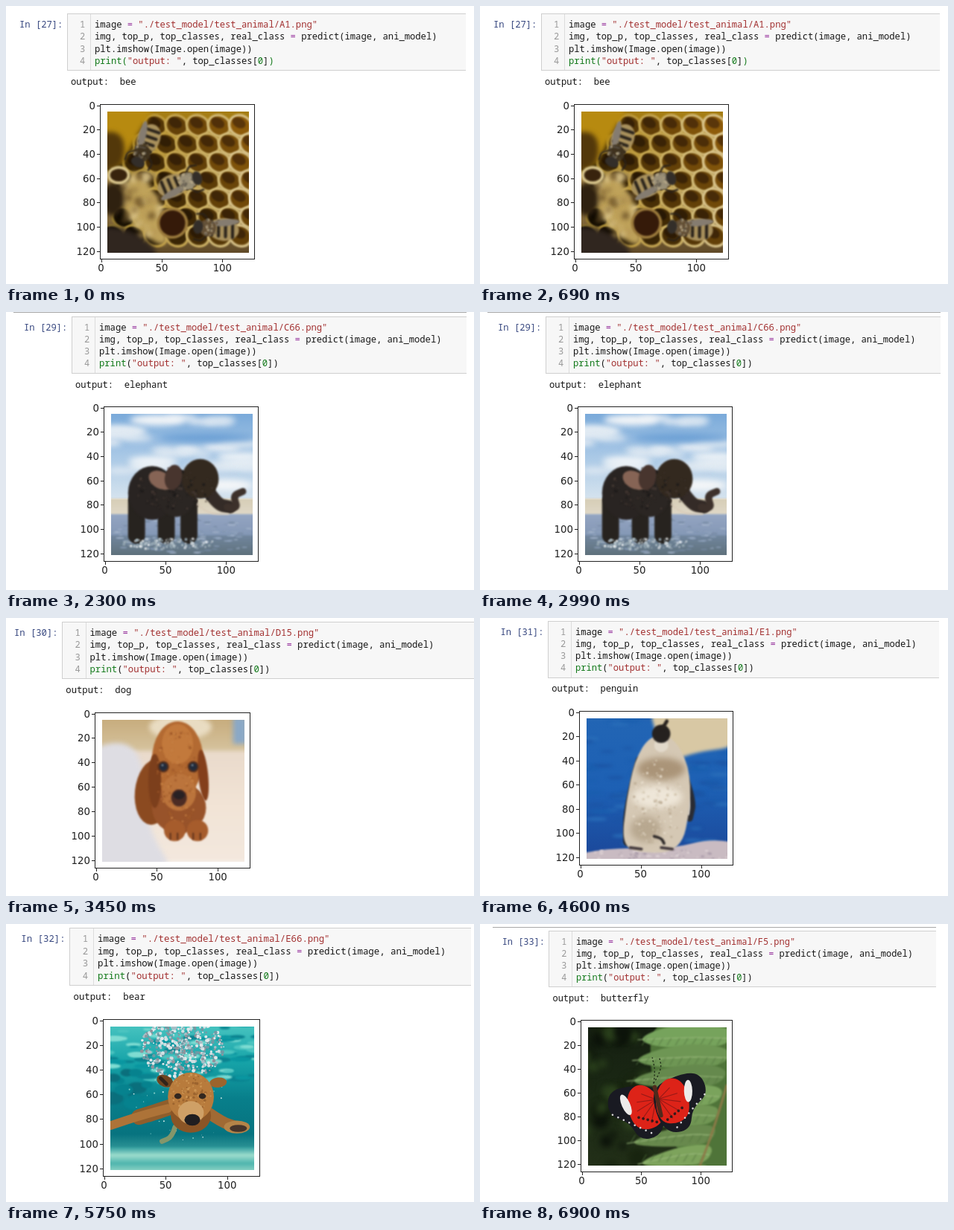
These frames come from a looping animation (628x374 px, 8 s). An HTML page with a canvas:

```html
<!DOCTYPE html>
<html lang="en">
<head>
<meta charset="utf-8">
<title>Animal classifier notebook</title>
<style>
html, body { margin: 0; width: 100%; height: 100%; overflow: hidden; background: #fff; }
canvas { display: block; }
</style>
</head>
<body>
<canvas id="stage" width="628" height="374"></canvas>
<script>
const g = document.getElementById('stage').getContext('2d');
const LOOP = 8000, STEP = 1150;
let seed = 1;
const rnd = () => (seed = (seed * 16807) % 2147483647) / 2147483647;
const soft = px => { g.filter = `blur(${px}px)`; };

function rect(color, x, y, w, h) {
  g.fillStyle = color;
  g.fillRect(x, y, w, h);
}

// Photos are drawn on a field of 100 by 100
function band(y0, y1, ...stops) {
  const f = g.createLinearGradient(0, y0, 0, y1);
  stops.forEach((c, i) => f.addColorStop(i / Math.max(1, stops.length - 1), c));
  rect(f, -5, y0, 110, y1 - y0);
}

function oval(color, x, y, rx, ry = rx, turn = 0) {
  g.beginPath();
  g.ellipse(x, y, rx, ry, turn, 0, 7);
  g.fillStyle = color;
  g.fill();
}

// Closed smooth shape through the midpoints of its corners
function blob(color, ...p) {
  const n = p.length;
  const mid = i => [(p[i % n] + p[(i + 2) % n]) / 2, (p[(i + 1) % n] + p[(i + 3) % n]) / 2];
  g.beginPath();
  g.moveTo(...mid(0));
  for (let i = 2; i <= n; i += 2) g.quadraticCurveTo(p[i % n], p[(i + 1) % n], ...mid(i));
  g.fillStyle = color;
  g.fill();
}

// Open smooth stroke with round ends
function limb(color, width, ...p) {
  const n = p.length;
  g.beginPath();
  g.moveTo(p[0], p[1]);
  for (let i = 2; i < n - 2; i += 2)
    g.quadraticCurveTo(p[i], p[i + 1], (p[i] + p[i + 2]) / 2, (p[i + 1] + p[i + 3]) / 2);
  g.lineTo(p[n - 2], p[n - 1]);
  g.strokeStyle = color;
  g.lineWidth = width;
  g.lineCap = g.lineJoin = 'round';
  g.stroke();
}

// Random dots inside an ellipse
function spots(n, colors, x, y, rx, ry, size, flat = 1) {
  for (let i = 0; i < n; i++) {
    const a = rnd() * 6.283, d = rnd() ** .6, r = size * (.3 + rnd() * .7);
    oval(colors[i % colors.length], x + Math.cos(a) * d * rx, y + Math.sin(a) * d * ry, r, r * flat);
  }
}

function placed(x, y, turn, draw) {
  g.save();
  g.translate(x, y);
  g.rotate(turn);
  draw();
  g.restore();
}

function honeybee(x, y, turn, coat) {
  placed(x, y, turn, () => {
    for (const side of [-1, 1]) limb('#2a2118', 1.3, 4, 0, 8, side * 10, 15, side * 9);
    oval('#a8905c', -5, 0, 11, 8);
    for (let s = -12; s < 4; s += 5) limb('#2c251c', 2.2, s, -5, s + 1, 5);
    oval('#857c70', -6, 5, 10, 2.5, -.2);
    oval(coat, 6, 0, 6, 6);
    spots(40, [coat, '#b7a888', '#5e574c'], 5, 0, 7, 6, 1);
    oval('#332e29', 13, 0, 3.5, 5);
  });
}

function bee() {
  band(0, 100, '#a57d12', '#a98a4e', '#604a28');
  soft(1);
  for (let r = 0; r < 7; r++) {
    for (let c = 0; c < 7; c++) {
      const x = 4 + c * 15 + (r % 2) * 7.5, y = 10 + r * 13;
      const light = 12 + c * 3 - r * 1.5;
      oval(`hsl(44 50% ${40 + c * 5}%)`, x, y, 9, 8, .5);
      oval(`hsl(37 85% ${light}%)`, x, y, 7.2, 6.3, .5);
      oval(`hsl(33 80% ${light * .65}%)`, x - 1, y - 2, 5, 3.5, .5);
    }
  }
  soft(3);
  blob('#b78a10', -15, -15, 38, -10, 18, 22, 10, 40, -15, 40);
  blob('#53380a', -10, 15, 12, 14, 12, 40, -10, 42);
  blob('#bfa25a', 5, 60, 22, 40, 38, 64, 45, 98, 25, 88);
  spots(50, ['#dcc68c', '#755a2d', '#b99b58'], 25, 66, 17, 24, 3);
  oval('#2f2110', 4, 62, 8, 12);
  blob('#30261f', -10, 80, 20, 84, 42, 105, -10, 110);
  soft(.8);
  oval('#d9c68d', 8, 45, 8, 6.5);
  oval('#38230d', 8, 45, 6, 4.5);
  oval('#9b7a3c', 46, 79, 11);
  oval('#351a09', 46, 79, 9);
  honeybee(27, 24, 2, '#40331f');
  honeybee(51, 51, -.3, '#9a9078');
  honeybee(77, 83, 3.25, '#665238');
}

function monkey() {
  band(0, 100, '#9fb32c', '#a9c02e', '#6d9228');
  soft(1.5);
  spots(240, ['#d4d83c', '#7e9d24', '#bccd30', '#5f8624'], 35, 50, 65, 65, 4);
  spots(90, ['#1e3a2c', '#3c6238', '#56657a', '#22303c'], 82, 14, 42, 24, 4);
  rect('#27304a', 68, 30, 35, 32);
  rect('#a9b2c4', 79, 34, 5, 22);
  spots(60, ['#8eb636', '#557f28'], 85, 75, 25, 14, 3);
  rect('#222c40', 81, 90, 25, 12);
  soft(.7);
  limb('#68635c', 5, 64, 13, 82, 12, 90, 36, 90, 55);
  limb('#262c38', 5, 90, 60, 91, 76, 76, 88);
  limb('#c99a42', 7, 66, 34, 80, 42, 83, 56);
  limb('#c48430', 6.5, 62, 36, 69, 52, 57, 65);
  limb('#857349', 21, 30, 40, 44, 31, 61, 21);
  oval('#84734f', 62, 26, 8, 15, -.2);
  limb('#82642d', 6, 32, 29, 46, 16, 61, 11);
  spots(180, ['#a08c5f', '#6f5f3c', '#8b6a34'], 47, 30, 22, 12, 1);
  limb('#d8ab48', 7, 27, 48, 25, 64, 10, 74);
  limb('#c57a20', 7, 41, 44, 48, 58, 45, 68);
  oval('#69645a', 16, 37, 8);
  oval('#dcc0b0', 12, 40, 3.5, 4.5);
  oval('#cf9482', 17, 39, 2, 3);
  oval('#342b2c', 9, 44, 3, 2.4);
  limb('#77737b', 8, 0, 83, 46, 74, 101, 56);
  for (let x = 1; x < 100; x += 5) {
    const y = 83 - x * .17 - x * x * .001;
    limb('#bdb8c0', 3, x - 1, y + 2, x + 1, y - 2);
    limb('#4a4854', .8, x + 1.5, y + 3, x + 3.5, y - 3);
  }
}

function elephant() {
  band(0, 60, '#7aaada', '#a9c8e6', '#d5e3ee');
  soft(4);
  spots(26, ['#eef3f7', '#dfe9f2', '#f4f6f8'], 50, 28, 58, 28, 20, .2);
  oval('#6b9fd4', 68, 17, 34, 3);
  soft(.8);
  band(60, 72, '#d6cdb6', '#e0d9c8');
  band(71, 88, '#94a5c2', '#8296b4');
  band(86, 101, '#71869e', '#5e707a');
  spots(130, ['#a3b3ca', '#73879f', '#8da0ba'], 50, 86, 60, 13, 3, .2);
  for (const x of [18, 39, 55]) limb('#27231f', 12, x, 62, x, 86);
  oval('#292422', 29, 56, 17, 19);
  oval('#2b2623', 46, 56, 14, 17);
  limb('#342b27', 9, 66, 50, 74, 64, 84, 66);
  limb('#3d312b', 5, 82, 66, 90, 68, 86, 58, 93, 55);
  oval('#33291f', 63, 46, 13, 14);
  spots(110, ['#463a34', '#1e1b1a', '#382e2a'], 45, 53, 28, 15, 1);
  oval('#866455', 35, 47, 9, 6, .5);
  oval('#48352e', 44, 45, 6, 9, .2);
  limb('#d9cbb8', .9, 61, 64, 68, 71, 83, 71);
  spots(130, ['#eef1f2', '#bccad0', '#94a6b0'], 42, 92, 34, 4, 1);
}

function puppy() {
  soft(3);
  band(-5, 25, '#c4a877', '#d8c6a2');
  oval('#e9dcc2', 55, 5, 22, 9);
  rect('#8aa8c6', 92, -2, 10, 19);
  band(22, 101, '#e9dacb', '#f2e4d6', '#f3e8de');
  blob('#dedde3', -20, 22, 28, 12, 30, 75, 55, 112, -20, 112);
  soft(1);
  oval('#8b4a20', 36, 51, 13, 23, .1);
  oval('#98532a', 54, 62, 19, 18);
  oval('#b36a32', 53, 28, 18, 27);
  oval('#c2793c', 53, 17, 11, 14);
  oval('#7c3f1c', 37, 43, 4.5, 19);
  oval('#843f1b', 71, 39, 3.5, 18, -.1);
  oval('#bb743c', 54, 51, 12, 13);
  spots(120, ['#c47e42', '#a05a2a'], 53, 40, 15, 36, 1);
  for (const x of [43, 64]) {
    oval('#57301d', x, 33, 4);
    oval('#222b3b', x, 33, 2.8);
    oval('#8292a0', x - .6, 32, .7);
  }
  oval('#4c2c24', 54, 55, 5.5, 6);
  oval('#282124', 54, 53, 4, 3);
  for (const x of [51, 67]) {
    oval('#a65c2c', x, 78, 7.5);
    for (const d of [-3, 2]) limb('#5b311c', 1, x + d, 80, x + d, 84);
  }
}

function penguin() {
  band(0, 100, '#2265b4', '#1d60b4', '#1b4799');
  soft(2);
  spots(100, ['#2a6fba', '#1b54a4', '#195eae'], 50, 45, 65, 55, 9, .15);
  blob('#d8c8a4', 44, -15, 110, -15, 110, 20, 78, 24, 62, 30, 48, 10);
  soft(.8);
  blob('#c9bbc2', -20, 100, 15, 92, 60, 93, 90, 85, 120, 92, 120, 120, -20, 120);
  spots(70, ['#ded2d5', '#a99ba9'], 50, 97, 60, 4, 1.5, .5);
  limb('#25272d', 6, 38, 30, 29, 62, 29, 88);
  limb('#2a2c33', 5, 69, 40, 76, 58, 73, 71);
  limb('#d0ccc6', 2, 70, 46, 73, 60, 72, 68);
  blob('#d5c8b4', 45, 12, 61, 12, 73, 34, 74, 62, 67, 95, 38, 96, 25, 90, 28, 60, 34, 30);
  soft(4);
  oval('#aa9478', 53, 36, 17, 8);
  oval('#eee6d8', 50, 56, 18, 8);
  oval('#b8a890', 42, 79, 11, 9);
  soft(.8);
  spots(120, ['#e6dccb', '#bcac94', '#d2c4ae'], 50, 60, 18, 30, 1);
  oval('#e2d9ca', 53, 19, 5);
  oval('#25211f', 53, 11, 6.5);
  limb('#29231f', 2.5, 54, 7, 57, 2);
  limb('#2d2828', 2, 48, 84, 53, 85, 55, 89);
  for (const x of [31, 53]) limb('#42383c', 2, x, 92, x + 8, 93);
}

function swimmer() {
  band(0, 100, '#45c2bf', '#16a3a8', '#087f8b', '#07737f', '#69c5b8');
  soft(1.2);
  spots(130, ['#7fdcd2', '#0b8390', '#4cc4c0', '#0a96a0'], 50, 14, 75, 28, 8, .25);
  spots(14, ['#0a6f7c', '#06828e'], 14, 42, 18, 12, 9, .6);
  band(84, 101, '#2f9c9c', '#9cdccd', '#4fb5ae', '#8fd4c6');
  soft(.6);
  spots(520, ['#dfe8ea', '#a9bec6', '#6f9aa4', '#8f939c', '#cfdfe2'], 50, 15, 29, 21, 1.3);
  spots(50, ['#d5eeeb', '#7fcac6'], 52, 52, 42, 28, .6);
  limb('#84966a', 3.5, 45, 70, 43, 77, 36, 80);
  limb('#8f5e2c', 11, 42, 56, 30, 60, 20, 63);
  limb('#ad7338', 6, 40, 57, 24, 61, 0, 69);
  limb('#a06a34', 8, 68, 60, 78, 67, 88, 70);
  oval('#b58448', 88, 70, 9, 4.5);
  oval('#46342a', 89, 71, 6, 2.5);
  oval('#8a5526', 56, 62, 14, 12);
  oval('#6f441f', 38, 38, 6, 4, .4);
  limb('#30241a', 2.5, 35, 36, 39, 40);
  oval('#9c642c', 75, 39, 6, 3.5, -.1);
  oval('#b87b3c', 56, 49, 16, 17);
  spots(120, ['#cc9452', '#9c642f', '#bd8445'], 56, 47, 14, 14, 1);
  oval('#cfa066', 56, 60, 9, 8);
  for (const x of [47, 64]) oval('#33271f', x, 48.5, 2.5, 2);
  oval('#201e20', 57, 65, 5.5, 4);
}

function butterfly() {
  band(0, 100, '#151f11', '#1b2914', '#222f18');
  soft(4);
  spots(40, ['#0c130a', '#2c421d', '#18240f'], 20, 50, 30, 55, 7);
  soft(1);
  blob('#4f7439', 45, -10, 120, -20, 120, 110, 85, 115, 58, 80, 45, 40);
  // Leaflets fan out from the stem on the right
  for (let i = 0; i < 8; i++) {
    const x = 102 - i * 2.5, y = 8 + i * 14, u = 36 - (i % 3) * 4, v = y - 4 + i;
    blob(`hsl(${98 - i} 28% ${50 - (i % 3) * 4}%)`, u - 6, v + 6, 65, v - 8, x + 4, y - 8, x, y + 5, 70, y + 9);
    limb('#9ab97c', .6, u, v + 5, 70, y - 1, x, y);
    for (let k = u + 6; k < x; k += 6) limb('#537540', .5, k, y, k - 3, y + 5);
  }
  limb('#8d7a48', 1.6, 100, 42, 92, 70, 80, 102);
  soft(.6);
  placed(50, 52, -.22, () => {
    for (const side of [-1, 1]) {
      g.save();
      g.scale(side, 1);
      blob('#191a22', -3, -8, 16, -14, 34, -13, 37, 4, 23, 12, 19, 26, 5, 27, -3, 16);
      blob('#dd2318', -2, -3, 10, -15, 22, -8, 22, 14, 12, 21, -2, 17);
      oval('#ecebea', 23, -1, 3, 8, .2);
      for (let a = -.9; a < 1.3; a += .5) limb('#961a17', .6, 1, 0, 1 + 15 * Math.cos(a), 4 + 13 * Math.sin(a));
      for (let i = 0; i < 8; i++) {
        oval('#d8d6d9', 34 - i * 3.5, 4 + i * 2.7, .7);
        if (i < 5) oval('#35191a', 4 + i * 3, 16 - i * 1.5, 1);
      }
      g.restore();
    }
    limb('#502a1c', 3, 0, -9, 0, 12);
    g.setLineDash([.6, 2]);
    for (const x of [3, 8]) limb('#25331c', .8, 0, -12, x, -20, x, -30);
    g.setLineDash([]);
  });
}

// x, y, adv: code origin and character width; left, top: axes; right: cell edge; rule: start and height of the line above
const scenes = [
  { file: 'A1', label: 'bee', x: 119, y: 25, adv: 7.3, left: 127, top: 133, right: 617, art: bee },
  { file: 'A4', label: 'monkey', x: 126, y: 25.5, adv: 7.2, left: 133, top: 132, right: 617, art: monkey },
  { file: 'C66', label: 'elephant', x: 125, y: 20.5, adv: 7.3, left: 132, top: 128, right: 618, rule: [10, 0], art: elephant },
  { file: 'D15', label: 'dog', x: 112.5, y: 20, adv: 7.34, left: 120, top: 128, right: 628, art: puppy },
  { file: 'E1', label: 'penguin', x: 128, y: 18.5, adv: 7.27, left: 134, top: 126, right: 616, art: penguin },
  { file: 'E66', label: 'bear', x: 123, y: 20, adv: 7.42, left: 131, top: 129, right: 624, art: swimmer },
  { file: 'F5', label: 'butterfly', x: 129, y: 24, adv: 7.18, left: 136, top: 130, right: 612, rule: [17, 4], art: butterfly }
];

const INK = '#161616', RED = '#a23030', GREEN = '#107818', OP = '#96309c', NAVY = '#384880';

function write(x, y, ...parts) {
  g.textAlign = 'left';
  for (const [text, color] of parts) {
    g.fillStyle = color;
    g.fillText(text, x, y + 4);
    x += g.measureText(text).width;
  }
}

function cell(s, i) {
  const k = s.adv / 7.3, l = Math.round(s.x - 37.5 * k), w = s.right - l;
  const t = Math.round(s.y - 14.7), h = Math.round(77 * k);
  if (s.rule) rect('#a8a8a8', s.rule[0], s.rule[1], s.right - s.rule[0], 1);
  rect('#cfcfcf', l, t, w, h);
  rect('#f7f7f7', l + 1, t + 1, w - 1, h - 2);
  rect('#dcdcdc', Math.round(s.x - 6), t + 1, 1, h - 2);
  g.font = `${s.adv / .6}px "Noto Sans Mono", "DejaVu Sans Mono", monospace`;
  write(s.x - 101 * k, s.y, [`In [${27 + i}]:`, NAVY]);
  const paren = i ? INK : GREEN;
  [
    [['image ', INK], ['= ', OP], [`"./test_model/test_animal/${s.file}.png"`, RED]],
    [['img, top_p, top_classes, real_class ', INK], ['=', OP], [' predict(image, ani_model)', INK]],
    [['plt.imshow(Image.open(image))', INK]],
    [['print', GREEN], ['(', paren], ['"output: "', RED], [', top_classes[', INK], ['0', GREEN], [']', INK], [')', paren]]
  ].forEach((line, n) => {
    const y = s.y + n * 16.3 * k;
    write(s.x - 20 * k, y, [n + 1, '#999']);
    write(s.x, y, ...line);
  });
  write(s.x - 32 * k, s.y + 77 * k, [`output:  ${s.label}`, INK]);
}

function plot({ left, top, adv, art }) {
  const w = Math.round(adv * 28.2), h = w + 1, bottom = top + h;
  g.save();
  g.beginPath();
  g.rect(left + 9, top + 9, w - 16, h - 17);
  g.clip();
  g.translate(left + 9, top + 9);
  g.scale((w - 16) / 100, (h - 17) / 100);
  seed = 7919;
  art();
  g.restore();
  g.strokeStyle = '#222';
  g.lineWidth = 1;
  g.strokeRect(left - .5, top - .5, w + 1, h + 1);
  g.font = '13.3px "DejaVu Sans", Verdana, sans-serif';
  g.textAlign = 'right';
  for (let v = 0; v <= 120; v += 20) {
    const y = top + .5 + v * h / 126.5;
    rect('#222', left - 5, Math.round(y), 4, 1);
    g.fillText(v, left - 7, y + 5);
  }
  g.textAlign = 'center';
  for (let v = 0; v <= 100; v += 50) {
    const x = left + .5 + v * w / 126.5;
    rect('#222', Math.round(x), bottom + 1, 1, 4);
    g.fillText(v, x, bottom + 16.5);
  }
}

let shown = -1;
const start = performance.now();
function tick() {
  const i = Math.min(6, Math.floor(((performance.now() - start) % LOOP) / STEP));
  if (i !== shown) {
    shown = i;
    rect('#fff', 0, 0, 628, 374);
    cell(scenes[i], i);
    plot(scenes[i]);
  }
  requestAnimationFrame(tick);
}
tick();
</script>
</body>
</html>
```
